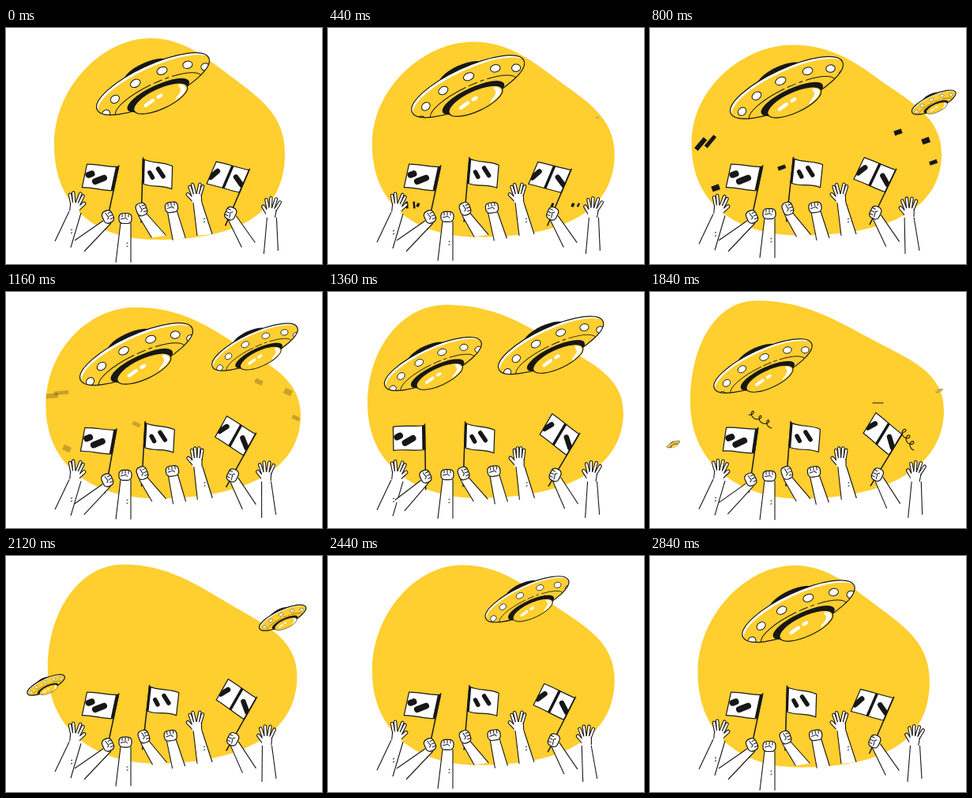
Animation, 400 px wide and 300 px high, one loop 2880 ms. Source, as an HTML page with a canvas:

```html
<!DOCTYPE html>
<html lang="en">
<head>
<meta charset="utf-8">
<title>Saucers over the crowd</title>
<style>
  html, body { margin: 0; width: 100%; height: 100%; overflow: hidden; background: #fff; }
  canvas { display: block; width: 400px; height: 300px; }
</style>
</head>
<body>
<canvas id="stage"></canvas>
<script>
const LOOP = 2880, STEP = 40, TAU = 2 * Math.PI;
const YELLOW = '#ffce2f', INK = '#171717', WHITE = '#fff';
const canvas = document.getElementById('stage');
const ratio = window.devicePixelRatio || 1;
canvas.width = 400 * ratio;
canvas.height = 300 * ratio;
const c = canvas.getContext('2d');
c.lineJoin = 'round';

const rad = degrees => degrees * Math.PI / 180;
const mix = (a, b, u) => a + (b - a) * u;

// Beats: a cosine that peaks at a time, and a soft plateau around a time.
const swing = (peak, cycles = 1) => t => Math.cos(TAU * cycles * (t - peak) / LOOP);
const pulse = (peak, width) => t => Math.exp(-(((t - peak) / width) ** 4));

function line(points, color, width, cap = 'butt') {
  c.beginPath();
  points.forEach(p => c.lineTo(...p));
  c.lineCap = cap;
  c.strokeStyle = color;
  c.lineWidth = width;
  c.stroke();
}

function ellipse(x, y, rx, ry, fill, stroke, width = 1.2, turn = 0) {
  c.beginPath();
  c.ellipse(x, y, rx, ry, turn, 0, TAU);
  if (fill) { c.fillStyle = fill; c.fill(); }
  if (stroke) { c.strokeStyle = stroke; c.lineWidth = width; c.stroke(); }
}

function placed(x, y, turn, paint) {
  c.save();
  c.translate(x, y);
  c.rotate(rad(turn));
  paint();
  c.restore();
}

// The backdrop swells mid-loop while its crown leans to the left.
const leanBeat = swing(1750), dip = t => Math.exp(-(((t - 900) / 600) ** 2));

function blobPath(t) {
  const swell = Math.sin(Math.PI * t / LOOP), lean = ((1 + leanBeat(t)) / 2) ** 2;
  const topX = 184 - 50 * lean, topY = 12 + 10 * dip(t) - 2 * lean;
  const right = 353 + 21 * swell, rightY = 160 - 10 * lean;
  const left = 61 - 11 * swell, leftY = 148 - 8 * lean;
  const bottom = 269 - 7 * swell;
  const bendX = 288, bendY = 64, slope = rad(37 - 9 * lean);
  const ux = Math.cos(slope), uy = Math.sin(slope), reach = .4 * (bendX - topX);
  const path = new Path2D();
  path.moveTo(topX, topY);
  path.bezierCurveTo(topX + reach, topY, bendX - reach * ux, bendY - reach * uy, bendX, bendY);
  path.bezierCurveTo(bendX + 45 * ux, bendY + 45 * uy, right, rightY - 48, right, rightY);
  path.bezierCurveTo(right, rightY + 72, 300, bottom, 190, bottom);
  path.bezierCurveTo(115, bottom, left, leftY + 80, left, leftY);
  path.bezierCurveTo(left, leftY - 72, topX - 62 + 10 * lean, topY, topX, topY);
  return path;
}

// Saucer flights by a few key points: time, x, y, scale.
const FLIGHTS = [
  [[420, 341, 114, .03], [760, 360, 97, .35], [1160, 315, 70, .76], [1520, 248, 67, 1],
   [1840, 143, 94, .87], [2300, 22, 192, .1]],
  [[1760, 367, 132, .02], [2060, 358, 85, .35], [2440, 252, 55, .74], [2880, 186, 71, 1],
   [4040, 165, 79, 1], [4400, 96, 110, .66], [4760, 28, 196, .1]]
];

// Smooth interpolation without overshoot.
function sample(keys, t) {
  let i = 0;
  while (i < keys.length - 2 && keys[i + 1][0] <= t) i++;
  const h = keys[i + 1][0] - keys[i][0], u = (t - keys[i][0]) / h;
  return keys[i].slice(1).map((a, j) => {
    const slope = k => keys[k] && keys[k + 1]
      ? (keys[k + 1][j + 1] - keys[k][j + 1]) / (keys[k + 1][0] - keys[k][0]) : 0;
    const tangent = k => {
      const p = slope(k - 1), q = slope(k);
      return p * q > 0 ? 2 * p * q / (p + q) : 0;
    };
    return mix(a, keys[i + 1][j + 1], u * u * (3 - 2 * u))
      + h * u * (1 - u) * (tangent(i) * (1 - u) - tangent(i + 1) * u);
  });
}

function drawSaucer(t, x, y, scale) {
  placed(x, y, -25, () => {
    c.scale(scale, scale);
    ellipse(-1, -16, 33, 13, INK);
    ellipse(0, 0, 78, 24, WHITE);
    c.save();
    c.beginPath();
    c.ellipse(0, 0, 78, 24, 0, 0, TAU);
    c.clip();
    ellipse(1, 4, 79, 24.5, YELLOW);
    // Portholes travel round the rim, 30 degrees apart.
    const spin = 14 - 60 * t / LOOP;
    for (let k = -3; k <= 5; k++) {
      const a = rad(spin + 30 * k);
      if (Math.abs(a) > 1.55) continue;
      ellipse(72 * Math.sin(a), 16 - 27 * Math.cos(a), 7 - 1.2 * Math.abs(a), 4.7, WHITE, INK, 1, a * .3);
    }
    c.setLineDash([62, 4, 12, 4, 5, 4]);
    c.beginPath();
    c.ellipse(0, 17, 60, 17, 0, Math.PI, TAU);
    c.strokeStyle = INK;
    c.lineWidth = 1;
    c.stroke();
    c.restore();
    ellipse(0, 0, 78, 24, null, INK, Math.min(1.2 / scale, 4));
    ellipse(0, 16, 43, 13, INK);
    ellipse(1, 21, 37, 13, YELLOW, INK, 1.2);
    c.beginPath();
    c.ellipse(1, 21, 35, 11.5, 0, -.6, 1.1);
    c.fillStyle = WHITE;
    c.fill();
    ellipse(-2, 20, 31, 11, YELLOW);
    line([[-20, 21], [-9, 19]], WHITE, 4.5, 'round');
    line([[-1, 18], [3, 17.5]], WHITE, 4.5, 'round');
  });
}

function drawSaucers(t) {
  for (const keys of FLIGHTS) {
    for (const time of [t, t + LOOP]) {
      if (time >= keys[0][0] && time <= keys[keys.length - 1][0]) drawSaucer(t, ...sample(keys, time));
    }
  }
}

// Paper scraps burst from the crowd and fade where they arrive.
const SCRAPS = [[70, 128], [57, 132], [77, 199], [165, 168], [320, 114], [357, 127], [367, 160]];

function drawScraps(t) {
  const p = (t - 440) / 800;
  if (p < 0 || p > 1) return;
  const travel = 1 - (1 - p) ** 3, size = Math.min(1, .5 + p * 2);
  c.fillStyle = INK;
  c.globalAlpha = Math.min(1, 2.4 * (1 - p));
  SCRAPS.forEach(([x, y], i) => {
    const w = (i < 2 ? 18 : 10) * size, h = (5 + i % 3) * size;
    const turn = (i < 2 ? -5 : 25) + (.9 - p) * 300;
    placed(mix(200 + (x - 200) * .7, x, travel), mix(225, y, travel), turn,
      () => c.fillRect(-w / 2, -h / 2, w, h));
  });
  c.globalAlpha = 1;
}

// Curled streamers run from one point to another.
const STREAMERS = [
  { start: 1400, from: [222, 179], to: [251, 158], loops: 1, radius: 5 },
  { start: 1720, from: [125, 156], to: [154, 173], loops: 3, radius: 3.6 },
  { start: 1720, from: [282, 141], to: [295, 141], loops: 0, radius: 0 },
  { start: 1720, from: [319, 178], to: [334, 201], loops: 3, radius: 3.6 }
];

function drawStreamers(t) {
  for (const { start, from, to, loops, radius } of STREAMERS) {
    const p = (t - start) / 240;
    if (p <= 0 || p >= 1) continue;
    const tail = Math.max(0, 2 * p - 1), head = Math.min(1, 2 * p), points = [];
    for (let i = 0; i <= 60; i++) {
      const u = mix(tail, head, i / 60), a = TAU * loops * u;
      points.push([
        mix(from[0], to[0], u) + radius * Math.sin(a),
        mix(from[1], to[1], u) + radius * (Math.cos(a) - 1)
      ]);
    }
    line(points, INK, 1.1, 'round');
  }
}

function drawFlag(flag, beat, x, y) {
  const pole = rad(flag.pole + flag.poleSway * beat);
  const angle = rad(flag.angle + flag.angleSway * beat);
  const ux = Math.sin(pole), uy = -Math.cos(pole);
  const topX = x + flag.length * ux, topY = y + flag.length * uy;
  const at = (u, v) => [
    topX + flag.side * flag.width * Math.cos(angle) * u - 31 * ux * v,
    topY + flag.width * Math.sin(angle) * flag.side * u - 31 * uy * v
  ];
  line([[topX + ux * 2, topY + uy * 2], [x - 17 * ux, y - 17 * uy]], INK, 1.5);
  const cloth = new Path2D(), r = flag.ripple;
  cloth.moveTo(...at(0, 0));
  cloth.bezierCurveTo(...at(.35, r), ...at(.65, -r / 2), ...at(1, r / 2));
  cloth.lineTo(...at(1, 1));
  cloth.bezierCurveTo(...at(.65, 1 - r), ...at(.35, 1 + r), ...at(0, 1));
  cloth.closePath();
  c.fillStyle = WHITE;
  c.fill(cloth);
  c.save();
  c.clip(cloth);
  for (const [u, v, u2, v2] of flag.marks) line([at(u, v), at(u2, v2)], INK, flag.size, 'round');
  if (flag.stripe) line([at(.5, -.1), at(.5, 1.1)], INK, 3.5);
  line([at(0, 0), at(0, 1)], INK, flag.band * 2);
  c.restore();
  c.strokeStyle = INK;
  c.lineWidth = 1.2;
  c.stroke(cloth);
}

const FLAGS = {
  left: {
    side: -1, length: 65, width: 40, pole: 12, poleSway: -14, angle: 6, angleSway: -8, ripple: .06,
    band: 3.5, size: 8, marks: [[.88, .46, .79, .4], [.63, .7, .38, .52]]
  },
  middle: {
    side: 1, length: 64, width: 38, pole: 4, poleSway: -2.3, angle: 10, angleSway: 1, ripple: .12,
    band: 2.5, size: 5.5, marks: [[.24, .5, .34, .68], [.52, .28, .7, .55]]
  },
  right: {
    side: -1, length: 60, width: 43, pole: 27, poleSway: 4.5, angle: 27, angleSway: 14, ripple: .03,
    band: 1, size: 6.5, marks: [[.28, .42, .03, .68], [.97, .7, .85, .38]], stripe: true
  }
};

// Finger directions in degrees from upright.
const SPREAD = [-22, -8, 7, 21], SPLIT = [-17, -11, 15, 20], CLOSED = [-7, -2, 2, 7];

function limb(points, width) {
  line(points, INK, width + 2.2, 'round');
  line(points, WHITE, width, 'round');
}

function drawOpenHand(x, y, { thumb, tilt, sway = 0, from, to = from, when }, beat, t) {
  const blend = when ? when(t) : 0;
  placed(x, y, tilt + sway * beat, () => {
    limb([[thumb * 4, 8], [thumb * 11, 0]], 2.8);
    from.forEach((angle, i) => {
      const a = rad(mix(angle, to[i], blend)), knuckle = (i - 1.5) * 3.2;
      const length = i % 3 ? 13.5 : 11;
      limb([[knuckle, 1], [knuckle + length * Math.sin(a), 1 - length * Math.cos(a)]], 2.3);
    });
    c.beginPath();
    c.roundRect(-5.9, 0, 11.8, 14, 4);
    c.fillStyle = WHITE;
    c.fill();
    line([[-thumb * 6.2, 1], [-thumb * 6.2, 11]], INK, 1.1);
  });
}

function drawFist(x, y, tilt) {
  placed(x, y, tilt, () => {
    c.beginPath();
    c.roundRect(-8, -6.5, 16, 13, 5);
    c.fillStyle = WHITE;
    c.fill();
    c.strokeStyle = INK;
    c.lineWidth = 1.2;
    c.stroke();
    for (const k of [-4, 0, 4]) line([[k, -6], [k, -1.5]], INK, 1);
    line([[-6, 1], [1, -.5], [3, 2]], INK, 1);
  });
}

// Wrist edges are relative to the hand, base edges to the stage.
const ARMS = [
  { hand: [88, 225], sway: [0, 3], beat: swing(1440), ticks: true,
    wrist: [-8, 11, 7, 13], base: [62, 274, 82, 282],
    open: { thumb: 1, tilt: 6, from: SPLIT, to: SPREAD, when: pulse(1840, 220) } },
  { hand: [129, 240], sway: [-6, -6], beat: pulse(1520, 300),
    wrist: [-6, 5, 4, 8], base: [87, 270, 99, 284], fist: 65, flag: FLAGS.left },
  { hand: [151, 237], sway: [0, -5], beat: swing(1440), ticks: true,
    wrist: [-6, 6, 7, 6], base: [139, 293, 158, 293], fist: 0 },
  { hand: [173, 230], sway: [-1.5, .5], beat: swing(0, 2),
    wrist: [-4, 8, 6, 5], base: [185, 266, 203, 263], fist: 70, flag: FLAGS.middle },
  { hand: [209, 228], sway: [-1.5, .5], beat: swing(440, 2),
    wrist: [-5, 6, 7, 5], base: [211, 270, 227, 267], fist: -8 },
  { hand: [241, 211], sway: [1, 0], beat: pulse(1500, 500), ticks: true,
    wrist: [-4, 11, 7, 11], base: [242, 264, 261, 262],
    open: { thumb: -1, tilt: -3, sway: 3, from: SPLIT, to: CLOSED, when: pulse(1500, 500) } },
  { hand: [286, 234], sway: [2, -2], beat: swing(1680),
    wrist: [-3, 8, 7, 3], base: [299, 277, 316, 271], fist: -65, flag: FLAGS.right },
  { hand: [333, 229], sway: [6, 0], beat: swing(220, 2),
    wrist: [-6, 12, 6, 12], base: [325, 287, 343, 283],
    open: { thumb: -1, tilt: 7, sway: 7, from: SPREAD } }
];

function drawArm({ hand, sway, beat, wrist, base, open, fist, flag, ticks }, t) {
  const b = beat(t), dx = sway[0] * b, dy = sway[1] * b;
  const x = hand[0] + dx, y = hand[1] + dy;
  const left = [[x + wrist[0], y + wrist[1]], [base[0] + dx * .4, base[1] + dy]];
  const right = [[x + wrist[2], y + wrist[3]], [base[2] + dx * .4, base[3] + dy]];
  if (flag) drawFlag(flag, b, x, y);
  if (open) drawOpenHand(x, y, open, b, t);
  c.beginPath();
  [left[0], left[1], right[1], right[0]].forEach(p => c.lineTo(...p));
  c.fillStyle = WHITE;
  c.fill();
  line(left, INK, 1.1);
  line(right, INK, 1.1);
  if (!open) drawFist(x, y, fist);
  if (ticks) {
    const mx = (left[0][0] + right[1][0]) / 2, my = (left[0][1] + right[1][1]) / 2;
    for (const k of [0, 4]) line([[mx + 1, my + k + 1], [mx + 3, my + k]], INK, 1);
  }
}

function draw(t) {
  c.setTransform(ratio, 0, 0, ratio, 0, 0);
  c.fillStyle = WHITE;
  c.fillRect(0, 0, 400, 300);
  const blob = blobPath(t);
  c.fillStyle = YELLOW;
  c.fill(blob);
  c.save();
  c.clip(blob);
  drawScraps(t);
  c.restore();
  drawSaucers(t);
  ARMS.forEach(arm => drawArm(arm, t));
  drawStreamers(t);
}

let start = null;
function tick(now) {
  if (start === null) start = now;
  const t = Math.max(0, now - start) % LOOP;
  draw(Math.floor((t + .5) / STEP) * STEP % LOOP);
  requestAnimationFrame(tick);
}
draw(0);
requestAnimationFrame(tick);
</script>
</body>
</html>
```
